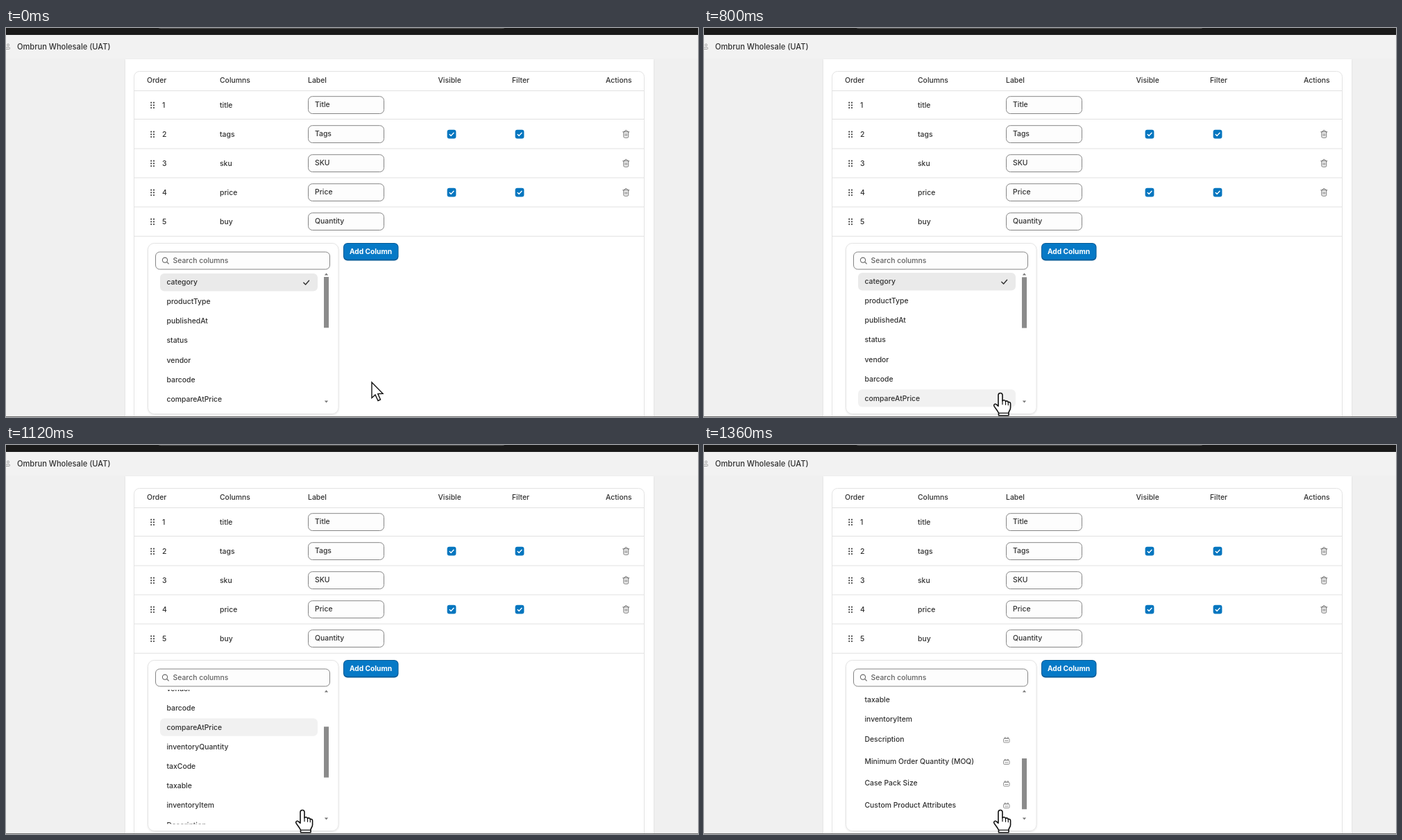
Recreate the animation shown at these times as an HTML page. Size 997 by 561 pixels, loop 1440 ms.

```html
<!DOCTYPE html>
<html lang="en">
<head>
<meta charset="utf-8">
<title>Column settings</title>
<style>
html, body { margin: 0; width: 100%; height: 100%; overflow: hidden; background: #f0f0f0; }
svg { display: block; width: 997px; height: 561px; }
text { font: 450 10.4px Inter, sans-serif; fill: #303030; white-space: pre; }
.store { font-size: 11.1px; }
.hint { fill: #616161; }
.button { font-size: 10.2px; font-weight: 700; fill: #fff; }
.line { fill: none; stroke-linecap: round; stroke-linejoin: round; }
</style>
</head>
<body>
<svg id="stage" viewBox="0 0 997 561" xmlns="http://www.w3.org/2000/svg">
  <defs>
    <clipPath id="view"><rect x="216" y="353" width="240" height="193.6"/></clipPath>
    <filter id="soft" x="-10%" y="-10%" width="120%" height="120%">
      <feDropShadow dx="0" dy="1" stdDeviation="1" flood-opacity=".1"/>
    </filter>
  </defs>
  <rect width="997" height="561" fill="#f0f0f0"/>
  <rect y="10" width="997" height="34" fill="#f2f2f2"/>
  <rect width="997" height="10" fill="#1a1a1a"/>
  <path d="M219 -1Q220 .6 224 .6H714Q718 .6 719 -1" fill="none" stroke="#555"/>
  <g fill="none" stroke="#a0a0a0">
    <circle cx="3" cy="24.5" r="1.5"/><rect x="-2" y="28" width="7.5" height="2.5" rx="1"/>
  </g>
  <text class="store" x="16" y="30.7">Ombrun Wholesale (UAT)</text>
  <rect x="172" y="45" width="761" height="530" fill="#fff" filter="url(#soft)"/>
  <rect x="184.5" y="62.5" width="735" height="520" rx="8" fill="#fff" stroke="#e3e3e3"/>
  <g id="table"></g>

  <rect x="204.5" y="310.5" width="274.5" height="246" rx="9" fill="#fff" stroke="#e4e4e4" filter="url(#soft)"/>
  <rect x="215.5" y="323" width="251" height="25" rx="6" fill="#fdfdfd" stroke="#858585"/>
  <g class="line" stroke="#6a6a6a" stroke-width="1.1">
    <circle cx="229" cy="334.7" r="3.6"/><path d="M231.7 337.4L234.3 340"/>
  </g>
  <text class="hint" x="240.5" y="338.6">Search columns</text>
  <g clip-path="url(#view)">
    <g id="list">
      <rect x="222" y="354" width="227" height="25.5" rx="6" fill="#eaeaea"/>
      <rect id="hover" x="222" y="522.3" width="227" height="25.5" rx="6" fill="#f1f1f1"/>
      <path class="line" d="M428.8 367.2L431.6 370L436.6 364.2" stroke="#303030" stroke-width="1.4"/>
    </g>
  </g>
  <path d="M458.8 356.5L461.5 353.5L464.2 356.5ZM458.8 537.5L461.5 540.5L464.2 537.5Z" fill="#777"/>
  <rect id="thumb" x="458" y="359" width="7" height="73.3" fill="#8b8b8b"/>

  <rect x="486" y="310" width="79.5" height="25.5" rx="6" fill="#055a96"/>
  <rect x="487" y="311" width="77.5" height="22.8" rx="5" fill="#0679c6"/>
  <text class="button" x="525.5" y="325.6" text-anchor="middle">Add Column</text>
  <rect y="560" width="997" height="1" fill="#6e6e6e"/>

  <path id="arrow" d="M0 0V22.5L5 18L9 26.5L12.5 25L8.8 16.6L16 16.3Z" fill="#fff" stroke="#111" stroke-width="1.4"/>
  <g id="hand" class="line" stroke="#111" stroke-width="1.6">
    <path fill="#fff" d="M-3 17V2.7A3 3 0 0 1 3 2.7V11C4 9.5 7 9.6 7.5 11.8C8.6 10.6 11 11 11.3 13C12.6 12.2 14.6 13 14.6 15V21C14.6 24 12 26 12 28V32H-2.5V28.5C-4 25 -7 22 -9 18.5C-10 16.5 -8 14.5 -5.8 16L-3 18.5Z"/>
    <path stroke-width="1.2" d="M3 11V16M7.5 12V16.5M11.3 13V17M-2.5 28.6H12"/>
  </g>
</svg>
<script>
const STEP = 80, LOOP = 1440;
const el = id => document.getElementById(id);

function add(parent, tag, attrs, label) {
  const node = document.createElementNS("http://www.w3.org/2000/svg", tag);
  for (const key in attrs) node.setAttribute(key, attrs[key]);
  if (label) node.textContent = label;
  parent.append(node);
}
const write = (parent, x, y, label) => add(parent, "text", { x, y }, label);
const stroke = (parent, d, color, width) =>
  add(parent, "path", { d, class: "line", stroke: color, "stroke-width": width });

// Table
const table = el("table");
const heads = { Order: 203, Columns: 308, Label: 435, Visible: 622.5, Filter: 729, Actions: 864 };
for (const name in heads) write(table, heads[name], 79.2, name);
for (const y of [90.5, 131.5, 174, 216, 258, 300.3])
  add(table, "rect", { x: 185, y: y - 0.5, width: 734, height: 1, fill: "#e1e1e1" });

function checkbox(x, y) {
  add(table, "rect", { x: x - 6.4, y: y - 6.4, width: 12.8, height: 12.8, rx: 3, fill: "#0576bf" });
  stroke(table, `M${x - 2.8} ${y + 0.2}l2 2l3.8 -4.2`, "#fff", 1.4);
}

function trash(y) {
  stroke(table, `M888.8 ${y - 3.2}h9M891.5 ${y - 3.4}v-.6q0 -1.4 1.8 -1.4t1.8 1.4v.6` +
    `M889.9 ${y - 3}v6.6q0 1.6 1.6 1.6h3.6q1.6 0 1.6 -1.6v-6.6M892.2 ${y - 0.7}v3.4M894.4 ${y - 0.7}v3.4`,
    "#686868", 0.95);
}

const rows = [["title", "Title"], ["tags", "Tags"], ["sku", "SKU"], ["price", "Price"], ["buy", "Quantity"]];
rows.forEach(([column, label], i) => {
  const y = 111 + 42 * i;
  for (let d = 0; d < 6; d++)
    add(table, "circle", { cx: 209.2 + 3.8 * (d % 2), cy: y - 3.3 + 3.7 * (d >> 1), r: 1.1, fill: "#444" });
  write(table, 225, y + 3.6, i + 1);
  write(table, 308, y + 3.6, column);
  add(table, "rect", { x: 435.5, y: y - 12.3, width: 109, height: 24.8, rx: 6, fill: "#fdfdfd", stroke: "#858585" });
  write(table, 445, y + 3.4, label);
  if (i % 2) [642, 740].forEach(x => checkbox(x, y + 0.2));
  if (i > 0 && i < 4) trash(y);
});

// Option list: plain fields, then taller rows with an icon
const list = el("list");
const fields = ["category", "productType", "publishedAt", "status", "vendor", "barcode", "compareAtPrice",
  "inventoryQuantity", "taxCode", "taxable", "inventoryItem"];
const extras = ["Description", "Minimum Order Quantity (MOQ)", "Case Pack Size", "Custom Product Attributes"];
fields.forEach((name, i) => write(list, 231.5, 370.2 + 28.08 * i, name));
extras.forEach((name, i) => {
  const y = 676.7 + 31.5 * i;
  write(list, 231.5, y + 3.7, name);
  stroke(list, `M432.8 ${y - 1.3}h6q1.3 0 1.3 1.3v3q0 1.3 -1.3 1.3h-6q-1.3 0 -1.3 -1.3v-3q0 -1.3 1.3 -1.3` +
    `M433 ${y - 1.5}v-1.3h1.8v1.3M436.8 ${y - 1.5}v-1.3h1.8v1.3M433.6 ${y + 1.8}h4.4`, "#858585", 0.9);
});

// Scroll offset per step, from step 10 on
const wheel = [1, 1, 5, 32.5, 128, 224.5, 247, 252];

function draw(ms) {
  const step = Math.floor(ms % LOOP / STEP);
  const p = Math.min(1, step / 6);
  const ease = 1 - (1 - p) ** 2;
  const x = 527 - 100 * ease;
  const y = 511 + 17 * Math.min(1, ease / 0.75);
  const scroll = step < 10 ? 0 : wheel[step - 10];
  const over = step >= 4;

  el("arrow").setAttribute("transform", `translate(${x} ${y})`);
  el("hand").setAttribute("transform", `translate(${x} ${y - 1.2})`);
  el("arrow").style.display = over ? "none" : "";
  el("hand").style.display = over ? "" : "none";
  el("hover").style.display = over && step < 15 ? "" : "none";
  list.setAttribute("transform", `translate(0 ${-scroll})`);
  el("thumb").setAttribute("y", 359 + scroll * 0.369);
}

const start = performance.now();
function tick() {
  draw(performance.now() - start);
  requestAnimationFrame(tick);
}
draw(0);
requestAnimationFrame(tick);
</script>
</body>
</html>
```
